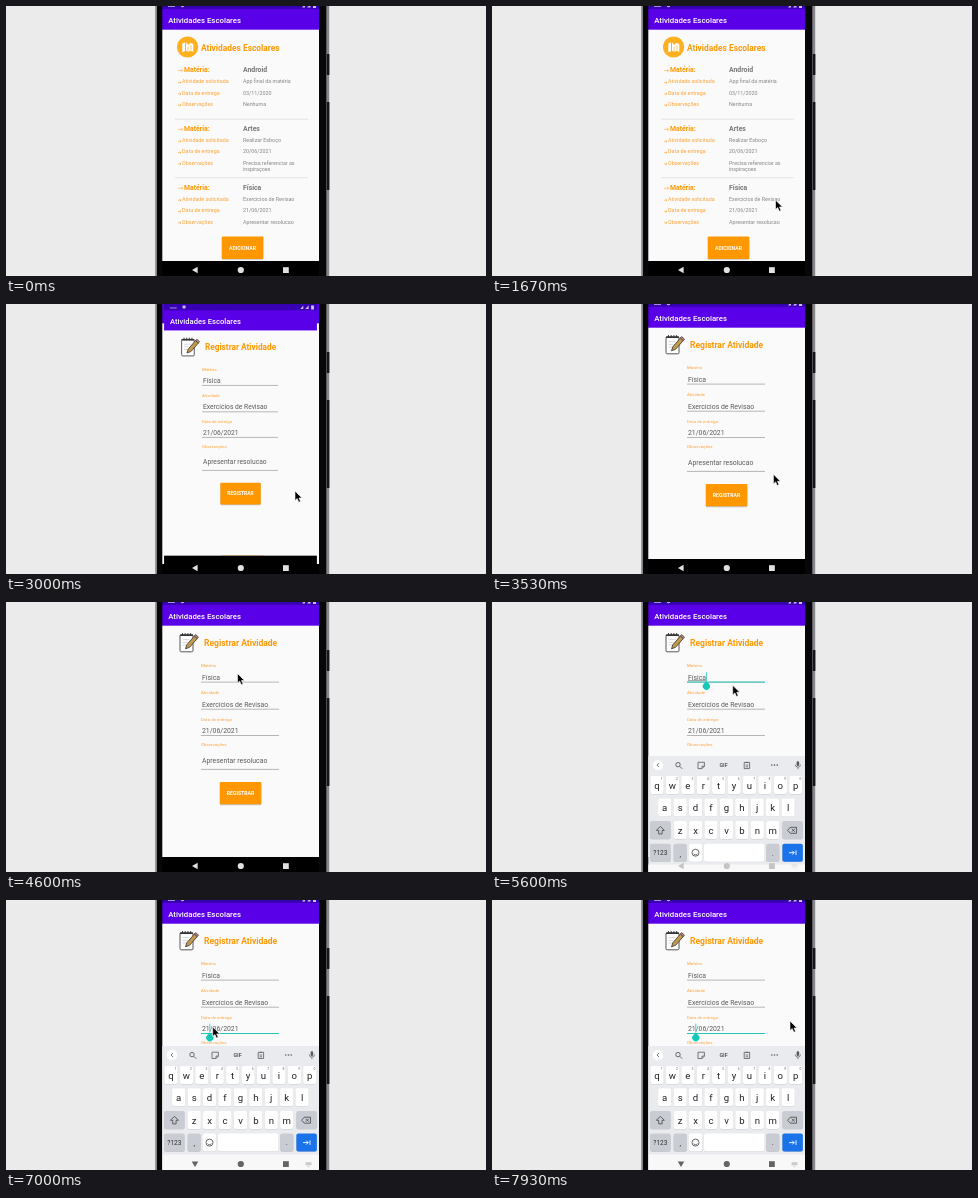
An HTML page for the animation above (8000 ms loop, 480 by 270 pixels).

```html
<!DOCTYPE html>
<html lang="pt">
<head>
<meta charset="utf-8">
<title>Atividades Escolares</title>
<style>
html, body { margin: 0; width: 100%; height: 100%; overflow: hidden; background: #ebebeb; }
svg { display: block; width: 480px; height: 270px; font-family: Roboto, sans-serif; }
</style>
</head>
<body>
<svg id="stage" viewBox="0 0 480 270" xmlns="http://www.w3.org/2000/svg"></svg>
<script>
const LOOP = 8000, ORANGE = '#ff9800', LABEL = '#ffa133', TEAL = '#14c9b6';

// Text is placed by the vertical middle of its capitals.
const text = (x, y, size, str, fill, extra = '') =>
  `<text x="${x}" y="${y + size * .355}" font-size="${size}" fill="${fill}" ${extra}>${str}</text>`;
const rect = (x, y, w, h, fill, extra = '') =>
  `<rect x="${x}" y="${y}" width="${w}" height="${h}" fill="${fill}" ${extra}/>`;
const line = (d, color, w = 1, extra = '') =>
  `<path d="${d}" fill="none" stroke="${color}" stroke-width="${w}" ${extra}/>`;
const group = (id, body) => `<g id="${id}">${body}</g>`;
const bold = 'font-weight="700"', mid = 'text-anchor="middle"';

const windowBase = () =>
  rect(156, -20, 157, 23.5, '#3700b3') +
  rect(156, 3, 157, 21, '#5a00e8') +
  rect(156, 23.7, 157, 231.3, '#fafafa') +
  rect(156, 255, 157, 30, '#000') +
  rect(162, 0, 7, 1, '#fff', 'opacity=".55"') +
  '<circle cx="176.5" cy="-.5" r="1.8" fill="#fff" opacity=".7"/>' +
  '<path d="M296 1.5 299 -2V1.5ZM301 1.5 304.5 -2V1.5ZM307 -2H310V2H307Z" fill="#fff" opacity=".75"/>' +
  text(162.2, 14, 7.8, 'Atividades Escolares', '#fff', 'font-weight="500"');

const button = (x, y, label) =>
  rect(x, y + .7, 41.5, 22.5, '#000', 'rx="1" opacity=".22"') +
  rect(x, y, 41.5, 22.3, ORANGE, 'rx=".8"') +
  text(x + 20.7, y + 11.2, 5.1, label, '#fff', `${bold} ${mid}`);

const arrow = (y, len) =>
  line(`M172 ${y + 1}h${len}m-1.3 -1.2l1.3 1.2l-1.3 1.2`, LABEL, .6);

function task(y, subject, ...values) {
  const labels = ['Atividade solicitada', 'Data de entrega', 'Observações'];
  let out = arrow(y, 4.6) + text(178, y, 6.88, 'Matéria:', ORANGE, bold) +
    text(237, y, 6.88, subject, '#777', bold);
  labels.forEach((label, i) => {
    const rowY = y + 12 + i * 11.3;
    out += arrow(rowY, 3) + text(176, rowY, 5.35, label, LABEL);
    values[i].split('|').forEach((part, n) =>
      out += text(237, rowY + n * 6.3, 5.35, part, '#858585'));
  });
  return out;
}

const list = windowBase() +
  '<circle cx="181.6" cy="41" r="10.6" fill="#ffb01f"/>' +
  '<path d="M176.3 37.5l2.7-1v8.7l-2.7 1zM180 36.3l2.3 2.6 2-2 3 1.2v7.7l-3-1-2 1-2.3-1z" fill="#fff"/>' +
  line('M182 40.5v4.5M185 39v5', '#ffb01f', .7) +
  text(195, 41.7, 8.4, 'Atividades Escolares', ORANGE, bold) +
  task(63.6, 'Android', 'App final da matéria', '03/11/2020', 'Nenhuma') +
  task(122.3, 'Artes', 'Realizar Esboço', '20/06/2021', 'Precisa referenciar as|inspiraçoes') +
  task(181.2, 'Física', 'Exercicios de Revisao', '21/06/2021', 'Apresentar resolucao') +
  line('M169 113.2H302M169 171.7H302', '#dedede', .8) +
  button(215.8, 230.6, 'ADICIONAR');

const field = (label, labelY, value, y, lineY) =>
  text(195, labelY, 4.4, label, LABEL) +
  text(196, y, 6.88, value, '#5c5c5c') +
  line(`M195 ${lineY}H273`, '#999', .7);

// Focused underline, handle and blinking caret.
const focus = (id, x, y) => group(id,
  line(`M195 ${y}H273`, TEAL, .9) +
  line(`M${x} ${y - 9.8}v9`, TEAL, .8, 'class="caret"') +
  `<path class="handle" d="M${x} ${y - .8}l2.6 2.5a3.6 3.6 0 1 1-5.2 0z" fill="${TEAL}"/>`);

const notepad =
  rect(174, 32.8, 13, 17, '#fff', 'rx="1.2" stroke="#444" stroke-width=".9"') +
  line('M174 33.2h13', '#333', 1.5) +
  line('M176.5 31v3M179.2 31v3M181.9 31v3M184.6 31v3', '#333', .9) +
  line('M176.5 37.7h7M176.5 40.4h5M176.5 43h4', '#aaa', .5) +
  '<path d="M179.5 46.8l1.3-4 7.6-8.8 2.9 2.5-7.7 8.8z" fill="#c39a4c" stroke="#333" stroke-width=".8"/>' +
  '<path d="M188.4 34l1.2-1.4 2.9 2.5-1.2 1.4z" fill="#d08a86" stroke="#333" stroke-width=".7"/>';

const form = windowBase() + notepad +
  text(198, 41.2, 8.5, 'Registrar Atividade', ORANGE, bold) +
  field('Matéria', 63.6, 'Física', 75.2, 80.1) +
  field('Atividade', 90.6, 'Exercícios de Revisao', 102.2, 107.2) +
  field('Data de entrega', 117, '21/06/2021', 128.2, 133.5) +
  field('Observações', 142.7, 'Apresentar resolucao', 158.2, 167.4) +
  button(213.8, 180, 'REGISTRAR') +
  group('compose', line('M196 78.6H214', '#666', .6)) +
  focus('focusA', 214.4, 80.1) + focus('focusB', 203.8, 133.5);

const key = (x, y, w, fill = '#fff') =>
  rect(x - w / 2, y - 8.6, w, 18, '#000', 'rx="2" opacity=".14"') +
  rect(x - w / 2, y - 9, w, 18, fill, 'rx="2"');
const letters = (str, x, y) => [...str].map((c, i) =>
  key(x + i * 15.42, y, 13.2) +
  text(x + i * 15.42, y + .5, 9.6, c, '#222', mid)).join('');

const GREY = '#c9ccd2', INK = '#555b61';
const keyboard =
  rect(156, 146, 157, 134, '#e9ebee') +
  rect(156, 254.5, 157, 140, '#f8f8f9') +
  '<circle cx="166" cy="155" r="5.2" fill="#fff"/>' +
  line('M167 153l-2 2 2 2', INK, .8) +
  line('M187.8 156.3l2.4 2.4M188.2 154.6a2.2 2.2 0 1 1-4.4 0a2.2 2.2 0 1 1 4.4 0', INK, .9) +
  line('M206 152.2h6.4v4l-2.3 2.3h-4.1zM210 158.3v-2.2h2.3M207.6 154.4h.1M210.4 154.4h.1', INK, .8) +
  text(231.5, 155, 5.4, 'GIF', INK, `${bold} ${mid}`) +
  line('M252.2 152.3h5.4v6.2h-5.4zM253.7 152.4h2.4M253.6 155h2.6M253.6 156.8h2.6', INK, .8) +
  [279.8, 282.5, 285.2].map(x => `<circle cx="${x}" cy="155" r=".8" fill="${INK}"/>`).join('') +
  rect(304.6, 151.2, 2.6, 4.8, INK, 'rx="1.3"') +
  line('M303.3 154.5a2.6 2.6 0 0 0 5.2 0M305.9 157.3v1.8', INK, .7) +
  letters('qwertyuiop', 165, 175) +
  [...'1234567890'].map((c, i) => text(169.6 + i * 15.42, 169, 3.4, c, '#666', mid)).join('') +
  letters('asdfghjkl', 172.7, 197.3) +
  key(168.4, 220, 20.5, GREY) + letters('zxcvbnm', 188.2, 220) + key(300.6, 220, 20.5, GREY) +
  line('M168.4 216.3l4 4h-2.3v3.6h-3.4v-3.6h-2.3z', '#444', .8) +
  line('M298.3 217.2h6.2v6h-6.2l-2.7-3zM299.8 218.7l3 3m0-3l-3 3', '#444', .8) +
  key(168.4, 242.6, 20.5, GREY) + text(168.4, 242.6, 6.6, '?123', '#333', mid) +
  key(188.2, 242.6, 13.2, GREY) + text(188.2, 243.6, 8, ',', '#333', mid) +
  key(203.6, 242.6, 13.2) +
  line('M207 242.6a3.5 3.5 0 1 1-7 0a3.5 3.5 0 1 1 7 0M201.7 243.6a2 2 0 0 0 3.6 0M202.3 241.3h.1M204.7 241.3h.1', '#444', .8) +
  key(242.2, 242.6, 60.5) +
  key(280.8, 242.6, 13.2, GREY) + text(280.8, 242.6, 8, '.', '#333', mid) +
  key(300.6, 242.6, 20.5, '#1a73e8') +
  line('M297 242.6h5.2m-1.9 -1.9l1.9 1.9l-1.9 1.9M304 240.3v4.6', '#fff', .9);

// Dark body between two lighter metal edges, with the side buttons on the right.
const phone =
  rect(149.2, -20, 174, 310, '#85858a') +
  rect(151, -20, 169.3, 310, '#07070a') +
  rect(320.8, 48, 2.6, 21, '#14161a', 'rx=".6"') +
  rect(320.8, 96, 2.6, 88, '#14161a', 'rx=".6"');

const nav =
  '<path id="back" d="M186 264l5.6-3.3v6.6z"/><circle cx="234.8" cy="264" r="3.1"/>' +
  '<rect x="277" y="261.2" width="5.8" height="5.8"/>' +
  '<path id="switch" d="M299.5 262.3h6v3h-6zM301 266.2h3l-1.5 1.4z" opacity=".3"/>';

stage.innerHTML =
  '<defs><clipPath id="screen"><rect x="156.3" y="-20" width="156.7" height="310"/></clipPath></defs>' +
  rect(0, 0, 480, 270, '#ebebeb') + phone +
  '<g clip-path="url(#screen)">' +
  group('list', list) + group('form', form) + group('keys', keyboard) + group('nav', nav) + '</g>' +
  '<path id="mouse" d="M0 0V9.6L2.2 7.6 3.8 11.2 5.5 10.4 4 7H7z" fill="#000" stroke="#fff" stroke-width=".6"/>';

const el = id => document.getElementById(id);
const ramp = (t, a, b) => Math.min(1, Math.max(0, (t - a) / (b - a)));
const show = (node, on) => node.setAttribute('visibility', on ? 'inherit' : 'hidden');
const zoom = s => `translate(234.5 130) scale(${s}) translate(-234.5 -130)`;

// Mouse stops: time, x, y.
const path = [
  [1180, 311, 272], [1670, 283.5, 194], [1930, 283, 191], [2600, 283, 191], [3000, 289, 187],
  [3330, 289, 187], [4130, 241, 81], [4200, 241, 81], [4600, 231.5, 71.5], [5430, 231.5, 71.5],
  [5600, 240.7, 83.3], [6200, 263.2, 114], [6300, 263.2, 114], [6730, 205, 127], [6960, 205, 127],
  [7470, 298, 121], [LOOP, 298, 121]
];
function mouseAt(t) {
  const i = path.findIndex(p => p[0] > t);
  if (i < 1) return [311, 290];
  const [a, b] = [path[i - 1], path[i]], u = ramp(t, a[0], b[0]), e = u * u * (3 - 2 * u);
  return [1, 2].map(k => a[k] + (b[k] - a[k]) * e);
}

function draw(t) {
  const open = 1 - (1 - ramp(t, 2880, 3280)) ** 4.8;
  el('list').setAttribute('transform', zoom(1 + .05 * open));
  show(el('list'), t < 3280);
  el('form').setAttribute('transform', zoom(.85 + .15 * open));
  el('form').setAttribute('opacity', ramp(t, 2890, 2950));

  const inA = t >= 4870 && t < 6930, inB = t >= 6930;
  show(el('focusA'), inA);
  show(el('focusB'), inB);
  show(el('compose'), t >= 5130 && inA);
  const lit = Math.floor((t - (inB ? 6930 : 5130)) / 500) % 2 === 0;
  document.querySelectorAll('.caret').forEach(c => show(c, lit));
  document.querySelectorAll('.handle').forEach(h => show(h, t >= 5130));

  const slide = 124 * (1 - ramp(t, 5450, 5750)) ** 3.9;
  el('keys').setAttribute('transform', `translate(0 ${slide})`);
  show(el('keys'), t >= 5450);
  const shade = Math.round(225 - 125 * ramp(t, 5540, 5800));
  el('nav').setAttribute('fill', `rgb(${shade},${shade},${shade})`);
  el('back').setAttribute('transform', `rotate(${-90 * ramp(t, 5610, 5850)} 189 264)`);
  show(el('switch'), t >= 5200);

  el('mouse').setAttribute('transform', `translate(${mouseAt(t)})`);
}

const start = performance.now();
function tick(now) {
  draw(Math.max(0, now - start) % LOOP);
  requestAnimationFrame(tick);
}
draw(0);
requestAnimationFrame(tick);
</script>
</body>
</html>
```
